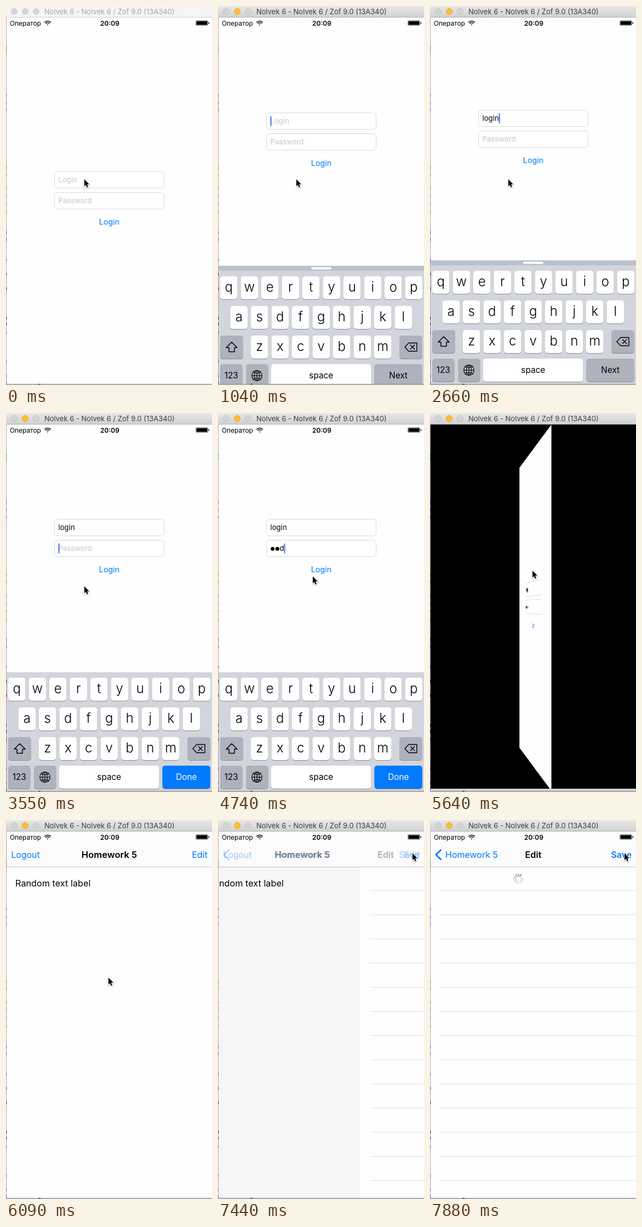
Animation of 376 by 690 pixels, one loop 8000 ms. Source, as an HTML page with a canvas:

```html
<!DOCTYPE html>
<html lang="en">
<head>
<meta charset="utf-8">
<title>Login flow</title>
<style>
html, body { margin: 0; width: 100%; height: 100%; overflow: hidden; background: #fff; }
canvas { display: block; width: 376px; height: 690px; }
</style>
</head>
<body>
<canvas id="stage"></canvas>
<script>
const W = 376, H = 690, TOP = 21, BOTTOM = 688, LOOP = 8000;
const MID_X = 188.5, MID_Y = (TOP + BOTTOM) / 2;
const FONT = 'Inter, "Noto Sans", sans-serif';
const BLUE = '#007aff';
const dpr = window.devicePixelRatio || 1;

const STEPS = [0, 600, 740, 890, 1040, 1180, 1330, 1470, 1620, 1770, 1920, 2070, 2220,
  2660, 2810, 2960, 3110, 3250, 3400, 3550, 3850, 4150, 4290, 4740, 4890, 5040, 5190,
  5340, 5490, 5640, 5790, 5940, 6090, 6690, 6840, 6990, 7140, 7290, 7430, 7580, 7730, 7880];
const MOUSE = [[4600, 143, 315.5], [4740, 173, 297.5], [4890, 187, 287], [6600, 187, 287], [7140, 355, 60.5]];
const FLIP = { start: 5292, length: 750, depth: 1198 };
const PUSH = 7360;

function makeContext(canvas) {
  canvas.width = W * dpr;
  canvas.height = H * dpr;
  const ctx = canvas.getContext('2d');
  ctx.scale(dpr, dpr);
  return ctx;
}
const screen = makeContext(document.getElementById('stage'));
const page = makeContext(document.createElement('canvas'));
let c = screen;

// Share of the way still to go in a critically damped spring.
function rest(t, start) {
  const x = Math.max(0, t - start) * 0.016;
  const r = (1 + x) * Math.exp(-x);
  return r < 0.004 ? 0 : r;
}

function rect(x, y, w, h, color) {
  c.fillStyle = color;
  c.fillRect(x, y, w, h);
}

function roundPath(x, y, w, h, r) {
  c.beginPath();
  c.moveTo(x + r, y);
  c.arcTo(x + w, y, x + w, y + h, r);
  c.arcTo(x + w, y + h, x, y + h, r);
  c.arcTo(x, y + h, x, y, r);
  c.arcTo(x, y, x + w, y, r);
  c.closePath();
}

function roundRect(x, y, w, h, r, color) {
  roundPath(x, y, w, h, r);
  c.fillStyle = color;
  c.fill();
}

function circle(x, y, r) {
  c.beginPath();
  c.arc(x, y, r, 0, Math.PI * 2);
}

function poly(points, closed) {
  c.beginPath();
  points.forEach(([x, y]) => c.lineTo(x, y));
  if (closed) c.closePath();
}

function stroke(color, width) {
  c.strokeStyle = color;
  c.lineWidth = width;
  c.stroke();
}

// Returns the width of the drawn text.
function text(str, x, y, size, { color = '#000', align = 'left', weight = 400, alpha = 1 } = {}) {
  if (alpha <= 0) return 0;
  c.save();
  c.globalAlpha = alpha;
  c.font = `${weight} ${size}px ${FONT}`;
  c.textAlign = align;
  c.fillStyle = color;
  c.fillText(str, x, y);
  const { width } = c.measureText(str);
  c.restore();
  return width;
}

function drawTitleBar(active) {
  const g = c.createLinearGradient(0, 0, 0, 20);
  g.addColorStop(0, active ? '#e9e8e9' : '#f6f6f6');
  g.addColorStop(1, active ? '#d2d1d2' : '#f4f4f4');
  rect(0, 0, W, 20, g);
  rect(0, 20, W, 1, active ? '#b4b3b4' : '#d2d2d2');
  [15, 35, 55].forEach((x, i) => {
    const lit = active && i === 1;
    circle(x, 10, 5.6);
    c.fillStyle = lit ? '#fdbe2f' : active ? '#d4d3d4' : '#d6d6d6';
    c.fill();
    stroke(lit ? '#e0a227' : active ? '#bfbebf' : '#cacaca', 0.8);
  });
  text('Nolvek 6 - Nolvek 6 / Zof 9.0 (13A340)', 70, 15, 13, { color: active ? '#3d3d3d' : '#a5a5a5' });
}

function drawStatus() {
  text('Оператор', 7, 35.5, 11.9);
  text('20:09', 189.5, 35.5, 12, { weight: 600, align: 'center' });
  for (const r of [3, 6, 9]) {
    c.beginPath();
    c.arc(76, 35.5, r - 1, -Math.PI * 0.75, -Math.PI * 0.25);
    if (r === 3) { c.lineTo(76, 35.5); c.fillStyle = '#000'; c.fill(); }
    else stroke('#000', 1.7);
  }
  roundPath(346.5, 26.5, 22, 9, 1.5);
  stroke('rgba(0,0,0,.6)', 0.7);
  rect(347.5, 27.5, 20, 7, '#000');
  rect(369.6, 29.5, 1.4, 3, '#000');
}

function drawField(y, value, hint, focused, dots = 0) {
  const size = 13.2;
  roundPath(88.5, y, 200, 30, 5);
  c.fillStyle = '#fff';
  c.fill();
  stroke('#dadada', 1);
  let x = 95.5;
  c.fillStyle = '#000';
  for (let i = 0; i < dots; i++, x += 8.5) {
    circle(x + 4.3, y + 15.7, 3.5);
    c.fill();
  }
  if (value) x += text(value, x, y + 19.7, size);
  else if (!dots) text(hint, x, y + 19.7, size, { color: '#c7c7cd' });
  if (focused) rect(x, y + 6, 2, 18, '#4a6cf0');
}

// The newest character stays readable, the ones before it are dots.
function password(t) {
  if (t < 3850) return ['', 0];
  if (t < 4150) return ['a', 0];
  if (t < 4290) return ['s', 1];
  return t < 5340 ? ['d', 2] : ['', 3];
}

function drawLogin(t, lift) {
  rect(0, TOP, W, BOTTOM - TOP, '#fefefe');
  const y = 301.5 - lift;
  const typed = t < 1620 ? 0 : Math.floor((t - 1620) / 148) + 1;
  const [last, dots] = password(t);
  drawField(y, 'login'.slice(0, typed), 'Login', t >= 740 && t < 2810);
  drawField(y + 38, last, 'Password', t >= 2810 && t < 5190, dots);
  const pressed = t >= 5040 && t < 5190;
  text('Login', 188.5, y + 96.5, 14.3, { color: BLUE, align: 'center', alpha: pressed ? 0.3 : 1 });
}

function key(x, y, w, color, label, size = 15.3, ink = '#000') {
  roundRect(x, y + 1, w, 42, 5, '#898b90');
  roundRect(x, y, w, 42, 5, color);
  const large = size > 20;
  text(label, x + w / 2, y + (large ? 27.5 : 26), size, { align: 'center', color: ink, weight: large ? 300 : 400 });
}

function drawKeyboard(t, top, bar) {
  const grey = '#adb2bd';
  const base = top + bar;
  rect(0, top, W, BOTTOM - top, '#d2d5db');
  if (bar > 0) {
    rect(0, top, W, bar, '#b9c1cb');
    if (bar > 6) roundRect(170, top + 2.5, 37, 4, 2, '#fff');
  }
  [['qwertyuiop', 4, 10], ['asdfghjkl', 22.5, 64], ['zxcvbnm', 60, 118]].forEach(([row, x, y]) => {
    [...row].forEach((ch, i) => key(x + i * 37.5, base + y, 31.5, '#fff', ch, 24));
  });
  key(4, base + 118, 42, grey, '');
  key(331, base + 118, 42, grey, '');
  key(4, base + 170, 40.5, grey, '123');
  key(51, base + 170, 40.5, grey, '');
  key(97, base + 170, 182.5, '#fff', 'space');
  const done = t >= 2810;
  key(285.5, base + 170, 87.5, done ? BLUE : grey, done ? 'Done' : 'Next', 15.3, done ? '#fff' : '#000');
  drawKeyIcons(base);
}

function drawKeyIcons(base) {
  c.save();
  c.lineJoin = 'round';
  c.translate(25, base + 139);
  poly([[0, -9], [10, 1], [5, 1], [5, 8.5], [-5, 8.5], [-5, 1], [-10, 1]], true);
  stroke('#000', 1.5);
  c.translate(327, 0);
  poly([[-11, 0], [-4, -7.5], [11, -7.5], [11, 7.5], [-4, 7.5]], true);
  stroke('#000', 1.4);
  poly([[-1, -4], [7, 4]]);
  stroke('#000', 1.4);
  poly([[-1, 4], [7, -4]]);
  stroke('#000', 1.4);
  c.translate(-281, 52);
  circle(0, 0, 9.3);
  stroke('#000', 1.2);
  c.beginPath();
  c.ellipse(0, 0, 4.6, 9.3, 0, 0, Math.PI * 2);
  stroke('#000', 1.1);
  [[0, 9.3], [9.3, 0]].forEach(([x, y]) => {
    poly([[-x, -y], [x, y]]);
    stroke('#000', 1.1);
  });
  for (const s of [-1, 1]) {
    c.beginPath();
    c.ellipse(0, s * 8, 7, 3.4, 0, s < 0 ? 0 : Math.PI, s < 0 ? Math.PI : Math.PI * 2);
    stroke('#000', 1.1);
  }
  c.restore();
}

function drawSpinner(t, x, y) {
  const turn = Math.floor(t / 83);
  c.lineCap = 'round';
  for (let i = 0; i < 12; i++) {
    const a = i * Math.PI / 6;
    const age = (turn - i + 24) % 12;
    const [dx, dy] = [Math.cos(a), Math.sin(a)];
    poly([[x + dx * 5, y + dy * 5], [x + dx * 9, y + dy * 9]]);
    stroke(`rgba(90,90,95,${Math.max(0.22, 0.75 - age * 0.09)})`, 1.8);
  }
  c.lineCap = 'butt';
}

function drawHome(t) {
  const left = rest(t, PUSH);
  const gone = 1 - left;
  const back = { color: BLUE, alpha: gone };
  rect(0, TOP, W, BOTTOM - TOP, '#fefefe');
  text('Random text label', 17 - gone * 112, 121, 16.25);

  if (gone > 0) {
    const x = 1 + left * 375;
    rect(0, 86, x, 602, `rgba(0,0,0,${0.1 * gone})`);
    rect(x, 86, W, 602, '#fefefe');
    for (let y = 128; y < BOTTOM; y += 44) rect(x + 17, y, W, 1, '#dfdfe1');
    drawSpinner(t, x + 160.5, 107);
  }

  rect(0, TOP, W, 64, '#fbfbfb');
  rect(0, 85, W, 1, '#c4c4c6');
  text('Logout', 9.5, 69, 15.8, { color: BLUE, alpha: 1 - gone * 2 });
  text('Homework 5', 188.5 - gone * 112, 69, 16.6, { weight: 600, align: 'center', alpha: 1 - gone * 1.5 });
  const pressed = t >= 7140 && t < 7430;
  text('Edit', 368, 69, 16.2, { color: BLUE, align: 'right', alpha: pressed ? 0.3 : 1 - gone * 2 });
  if (gone > 0) {
    text('Homework 5', 28 + left * 112, 69, 16, back);
    text('Edit', 188.5 + left * 170, 69, 16.2, { weight: 600, align: 'center', alpha: gone });
    text('Save', 368, 69, 15.8, { ...back, weight: 600, align: 'right' });
    c.globalAlpha = gone;
    poly([[20.5, 54], [11, 63.3], [20.5, 72.6]]);
    stroke(BLUE, 2.8);
    c.globalAlpha = 1;
  }
}

// Turns the page about its upright axis; the near edge stays in the screen plane.
function drawFlip(angle) {
  const near = angle < Math.PI / 2 ? 1 : -1;
  const cos = Math.abs(Math.cos(angle)), sin = Math.sin(angle);
  const half = 187.5, d = FLIP.depth;
  const clamp = u => Math.min(half, Math.max(-half, u));
  const scale = u => d / (d + (half - near * u) * sin);
  const project = u => MID_X + u * cos * scale(u);
  const unproject = x => (x - MID_X) * (d + half * sin) / (cos * d + near * (x - MID_X) * sin);
  const start = project(-half), end = project(half);
  const height = BOTTOM - TOP;

  rect(0, TOP, W, height, '#000');
  for (let x = Math.floor(start); x < end; x++) {
    const x0 = Math.max(x, start), x1 = Math.min(x + 1, end);
    const u0 = clamp(unproject(x0)), u1 = clamp(unproject(x1));
    const h = height * scale((u0 + u1) / 2);
    c.drawImage(page.canvas, (u0 + MID_X) * dpr, TOP * dpr, (u1 - u0) * dpr, height * dpr,
      x0, MID_Y - h / 2, x1 - x0, h);
  }
}

// Slivers of the windows behind, seen at the left and bottom edges.
function drawEdges() {
  rect(0, TOP, 1, H - TOP, '#a9a9ab');
  const marks = [
    ['#2c9c5a', 74, 81], ['#6a3fc0', 160, 174, 187], ['#4c9a2c', 292, 305, 330, 358, 373],
    ['#3a8fb5', 344], ['#4343c8', 410, 423, 460], ['#222', 486, 512, 566, 577],
    ['#4343c8', 592], ['#6a3fc0', 645, 671, 683]
  ];
  marks.forEach(([color, ...ys]) => ys.forEach(y => rect(0, y, 1, 5, color)));
  rect(0, BOTTOM, W, 1, '#8f8f93');
  rect(0, BOTTOM + 1, W, 1, '#c3c3c8');
  rect(59, BOTTOM, 4, 1, '#111');
}

function drawMouse(t) {
  let [, x, y] = MOUSE[0];
  for (let i = 1; i < MOUSE.length; i++) {
    const [t0, x0, y0] = MOUSE[i - 1], [t1, x1, y1] = MOUSE[i];
    if (t < t0) break;
    const p = Math.min(1, (t - t0) / (t1 - t0));
    x = x0 + (x1 - x0) * p;
    y = y0 + (y1 - y0) * p;
  }
  c.save();
  c.translate(x, y);
  poly([[0, 0], [0, 12.6], [2.8, 9.9], [4.8, 14.6], [6.9, 13.7], [5, 9.1], [8.9, 9]], true);
  c.shadowColor = 'rgba(0,0,0,.35)';
  c.shadowBlur = 2 * dpr;
  c.shadowOffsetY = dpr;
  stroke('#fff', 1.8);
  c.shadowColor = 'transparent';
  c.fillStyle = '#000';
  c.fill();
  c.restore();
}

function draw(t) {
  const bar = Math.round(9 * rest(t, 2800));
  const shown = Math.round((216 + bar) * (1 - rest(t, 735)) * rest(t, 5262));
  const turn = Math.min(1, Math.max(0, (t - FLIP.start) / FLIP.length));
  const angle = Math.PI * (1 - Math.cos(Math.PI * turn)) / 2;
  const flipping = turn > 0 && turn < 1;

  c = flipping ? page : screen;
  if (angle < Math.PI / 2) drawLogin(t, Math.floor(shown / 2));
  else drawHome(t);
  c = screen;
  if (flipping) drawFlip(angle);

  drawStatus();
  if (shown > 0) drawKeyboard(t, BOTTOM - shown, bar);
  drawTitleBar(t >= 600);
  drawEdges();
  drawMouse(t);
}

const begin = performance.now();
let last = -1;
function tick() {
  const t = (performance.now() - begin) % LOOP;
  let i = STEPS.length - 1;
  while (STEPS[i] > t) i--;
  if (i !== last) draw(STEPS[i]);
  last = i;
  requestAnimationFrame(tick);
}
tick();
</script>
</body>
</html>
```
